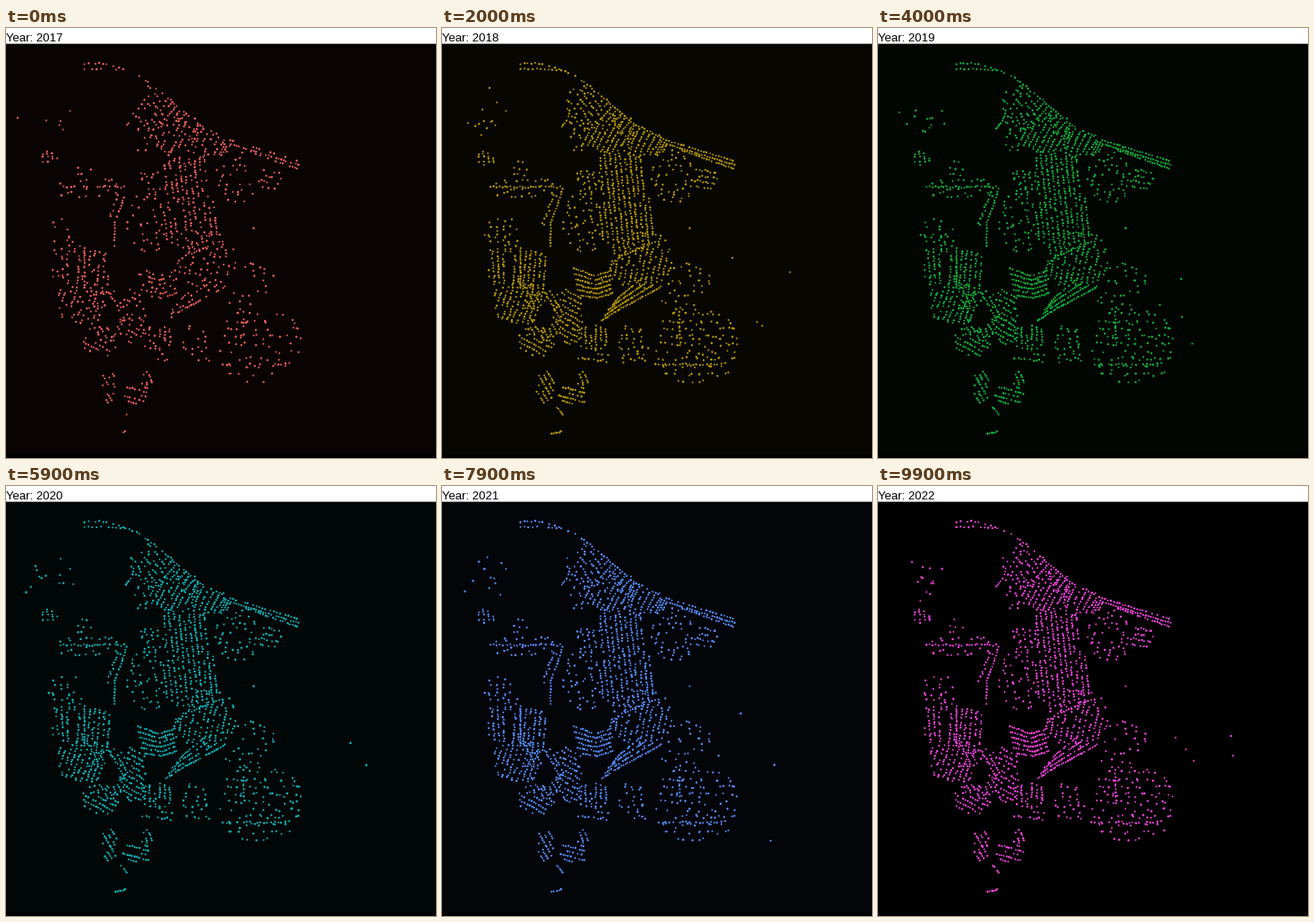
Recreate the animation shown at these times as a matplotlib script. Size 480 by 480 pixels, loop 10000 ms.

```python
import numpy as np
import matplotlib.pyplot as plt
from matplotlib.animation import FuncAnimation
from matplotlib.colors import to_rgb
from matplotlib.patches import Rectangle

SIZE, DPI = 480, 100
PX = 72 / DPI
rng = np.random.default_rng(11)
dots = np.empty((0, 2))


def add(xy, clear=2.1):
    """Keep only the new dots that stand clear of the earlier ones."""
    global dots
    if len(dots):
        gap = np.hypot(*(xy[:, None] - dots[None]).transpose(2, 0, 1))
        xy = xy[gap.min(axis=1) > clear]
    dots = np.vstack([dots, xy])


def along(points, step):
    """Positions and directions at even steps along a polyline."""
    p = np.array(points, float)
    legs = np.diff(p, axis=0)
    dist = np.r_[0, np.cumsum(np.hypot(*legs.T))]
    t = np.arange(0, dist[-1], step)
    xy = np.c_[np.interp(t, dist, p[:, 0]), np.interp(t, dist, p[:, 1])]
    leg = legs[np.searchsorted(dist, t, side="right") - 1]
    return xy, leg / np.hypot(*leg.T)[:, None]


def street(*points, step=2.9, jitter=0.3):
    xy, _ = along(points, step)
    add(xy + rng.normal(0, jitter, xy.shape), 1.5)


def district(x, y, rx, ry, angle, spread=1.0, hole=0.0):
    """Rounded block of parallel streets running at an angle in degrees."""
    reach = max(rx, ry) * 1.5
    u, v = np.meshgrid(np.arange(-reach, reach, 3.0 * spread),
                       np.arange(-reach, reach, 5.6 * spread))
    u = u + rng.uniform(0, 3, (len(u), 1))
    c, s = np.cos(np.radians(angle)), np.sin(np.radians(angle))
    xy = np.c_[(u * c - v * s).ravel(), (u * s + v * c).ravel()]
    xy += rng.normal(0, 0.45 * spread ** 3, xy.shape)
    r = (np.abs(xy / (rx, ry)) ** 2.6).sum(axis=1)
    keep = rng.random(len(xy)) < 0.87 - 0.12 * (spread > 1)
    add(xy[(r < 1) & (r >= hole) & keep] + (x, y))


def coast():
    shore = [(87, 39), (112, 40), (148, 52), (185, 82),
             (213, 106), (250, 125), (326, 148)]
    street(*shore[:4], step=4, jitter=0.7)
    street(*shore[3:], step=3.4)
    street((87, 45), (108, 45), (134, 47), step=4.5)
    for k in (1, 2):
        street((246 + 8 * k, 126 + 4 * k), (326, 148 + 4.5 * k))
    # Short lanes run inland at right angles to the shore.
    for at, way in zip(*along(shore[3:6], 6.5)):
        inland = np.array([-way[1], way[0]])
        street(at + 3 * inland, at + rng.uniform(12, 22) * inland)


def north():
    street((131, 112), (138, 104), (142, 95))
    district(160, 88, 22, 25, 55, 1.1)
    district(186, 115, 28, 23, 118)
    district(225, 130, 26, 13, 115)
    district(150, 122, 10, 16, 110, 1.3)


def west():
    district(48, 145, 10, 10, 86)
    district(87, 157, 9, 9, 10, 1.15)
    street((54, 177), (134, 177), step=3.2, jitter=0.6)
    street((134, 179), (121, 218), (120, 246), step=3.3)
    street((126, 184), (111, 220), step=3.5, jitter=0.7)
    district(95, 179, 40, 12, 0, 1.5)
    district(66, 232, 19, 22, 90, 1.35)


def centre():
    district(163, 172, 17, 14, 80, 1.1)
    district(200, 162, 27, 30, 84)
    district(206, 214, 32, 33, 84)
    district(222, 258, 34, 32, 102, 1.05)
    district(257, 164, 24, 30, 105, 1.35)
    district(293, 168, 14, 13, 10, 1.1)
    district(158, 216, 24, 34, 84, 1.5)
    district(268, 288, 30, 26, 0, 1.9)


def southwest():
    street((87, 246), (87, 291), step=2.4)
    district(62, 268, 11, 19, 86)
    district(97, 273, 22, 26, 95)
    district(84, 306, 27, 24, 110)
    district(113, 320, 22, 28, 60, 1, hole=0.16)
    district(105, 350, 20, 17, 30)
    district(142, 322, 15, 31, 30)
    district(168, 345, 17, 15, 90)
    district(168, 369, 22, 6, 5, 1.2)
    for k in range(6):
        street((147 + k, 268 + 6 * k), (169 + k, 276 + 5 * k),
               (190, 270 + 5 * k), step=2.6)
    for k in range(4):
        street((178 + 4 * k, 326 - 6 * k), (192 + 2 * k, 317 - 6 * k),
               (243 - 7 * k, 289 - 3 * k), step=2.6)
    street((178, 281), (195, 256), (242, 236), step=3.3)


def south():
    district(283, 354, 46, 42, 0, 1.5)
    district(212, 354, 18, 23, 80, 1.4)
    street((238, 375), (312, 375), step=3.8, jitter=0.6)
    street((265, 312), (265, 358), step=4.2)
    district(115, 401, 10, 18, 60, 0.95)
    district(146, 409, 17, 10, 15, 0.9)
    district(157, 392, 6, 10, 70)
    street((128, 423), (135, 432), step=2.5)
    street((122, 452), (133, 450), step=2.2)


for region in (coast, north, west, centre, southwest, south):
    region()
lone = np.array([(71, 92), (59, 108), (276, 223), (298, 276)], float)
rank = rng.random(len(dots))

# start (ms), dot colour, share of dots shown
SETS = [(0, "#f4625c", 0.54), (2000, "#b89a06", 0.96), (4000, "#12b43c", 0.93),
        (5900, "#10b6bb", 0.84), (7900, "#568ffc", 0.87), (9900, "#f545e0", 0.87)]


def strays(first):
    """A loose handful off the west shore, and a few far to the east."""
    near = rng.normal((47, 104), (15, 11), (4 if first else 11, 2))
    far = rng.normal((345, 315), (32, 40), (0 if first else 5, 2))
    return np.vstack([lone, near, far])


layers = []
for start, colour, share in SETS:
    mix = 0.75 * rank + 0.25 * rng.random(len(dots))
    xy = np.vstack([dots[mix <= np.quantile(mix, share)], strays(start == 0)])
    layers.append((xy + 0.5, (rng.uniform(1.8, 2.6, len(xy)) * PX) ** 2))

fig = plt.figure(figsize=(SIZE / DPI, SIZE / DPI), dpi=DPI, facecolor="black")
ax = fig.add_axes([0, 0, 1, 1])
ax.set(xlim=(0, SIZE), ylim=(SIZE, 0))
ax.axis("off")
panel = ax.add_patch(Rectangle((0, 17), SIZE, 459, lw=0))
ax.add_patch(Rectangle((0, 0), SIZE, 17.6, color="white", lw=0, snap=False))
cloud = ax.scatter([], [], linewidths=0)
title = ax.text(0, 15, "", family="Liberation Sans", size=13.2 * PX,
                color="black", va="baseline")


def update(frame):
    ms = frame * 100
    i = sum(ms >= s[0] for s in SETS) - 1
    xy, area = layers[i]
    colour = np.array(to_rgb(SETS[i][1]))
    cloud.set_offsets(xy)
    cloud.set_sizes(area)
    cloud.set_facecolor(colour)
    plain = 1000 <= ms < 2000 or ms >= 9900
    panel.set_facecolor("black" if plain else colour * 0.036)
    title.set_text(f"Year: {2017 + (ms + 1000) // 2000}")
    return panel, cloud, title


anim = FuncAnimation(fig, update, frames=100, interval=100, repeat=True,
                     repeat_delay=0, blit=False)
plt.show()
```
